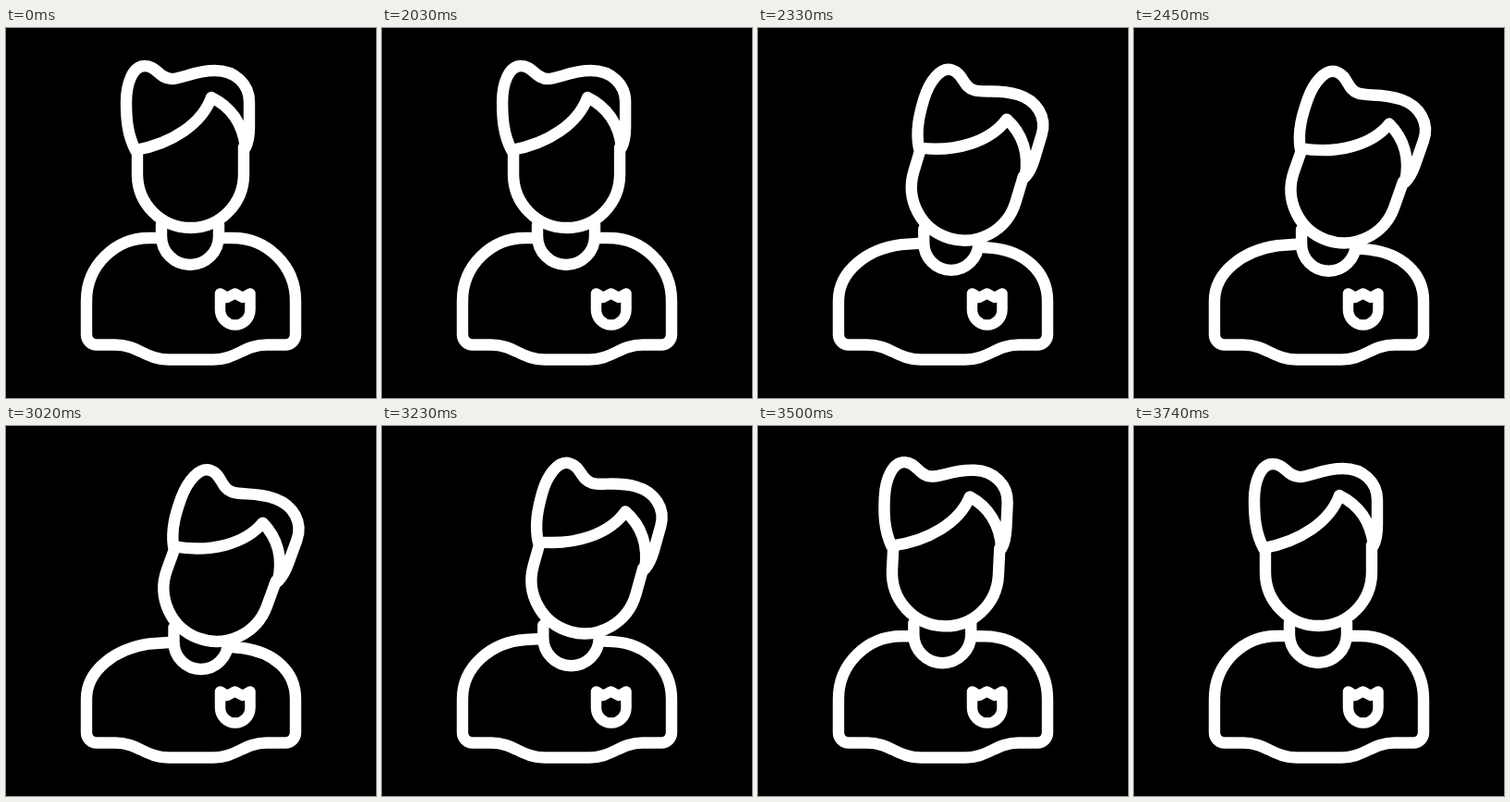
Recreate the animation shown at these times as an HTML page. Size 400 px wide and 400 px high, loop 3.77 s.

```html
<!DOCTYPE html>
<html lang="en">
<head>
<meta charset="utf-8">
<title>Officer tilting his head</title>
<style>
  html, body { margin: 0; width: 100%; height: 100%; overflow: hidden; background: #000; }
  svg { display: block; width: 100vw; height: 100vh; }
</style>
</head>
<body>
<svg viewBox="0 0 400 400" fill="none" stroke="#fff" stroke-width="12.400" stroke-linecap="round" stroke-linejoin="round">
  <path id="body"/>
  <path d="M231.500 287L239 291.500L247.500 287L256 291.500L264 287V304.500A16.250 16.500 0 0 1 231.500 304.500Z" stroke-width="11.500"/>
  <path id="neck"/>
  <g id="head" fill="#000">
    <path d="M142 133V158A57.500 58 0 0 0 257 158V129"/>
    <path d="M140 132C131 115 130 97 130 80C130 60 137 41 150 41C163 41 166 55 179 55C191 55 203 46 226 46C247 46 263 60 263 80V107C263 116 262 123 259 129C256 104 243 85 222 75C212 103 180 125 140 132Z"/>
  </g>
</svg>
<script>
const LOOP = 3770;
const TILT = 20;
const PIVOT = [200, 215];
const [body, neck, head] = ['body', 'neck', 'head'].map(id => document.getElementById(id));

// Cubic Bézier easing with flat ends; a and b are the horizontal handles.
function ease(x, a, b) {
  if (x <= 0) return 0;
  if (x >= 1) return 1;
  let lo = 0, hi = 1;
  for (let i = 0; i < 24; i++) {
    const s = (lo + hi) / 2, r = 1 - s;
    if (3 * a * s * r * r + 3 * b * s * s * r + s ** 3 < x) lo = s; else hi = s;
  }
  return lo * lo * (3 - 2 * lo);
}

function draw(t) {
  const lean = ease((t - 2010) / 560, 0.47, 0.22);
  const turn = lean - ease((t - 3010) / 740, 0.45, 0.38);
  const shift = lean - ease((t - 3010) / 620, 0.38, 0.2);
  const mix = (from, to) => from + (to - from) * shift;
  const pt = (x, y, x2, y2) => `${mix(x, x2).toFixed(2)} ${mix(y, y2).toFixed(2)} `;

  body.setAttribute('d',
    'M' + pt(162, 227, 176, 234) + 'L' + pt(155, 227, 155, 235.5) +
    'C' + pt(117.4, 227, 118, 241) + pt(87, 257.4, 87, 264) + '87 295' +
    'V331.500A11 11 0 0 0 98 342.500H118C143 342.500 151 358.500 176 358.500' +
    'H224C249 358.500 257 342.500 282 342.500H302A11 11 0 0 0 313 331.500V295' +
    'C' + pt(313, 257.4, 313, 264) + pt(282.6, 227, 288, 244) + pt(245, 227, 255, 240) +
    'L' + pt(236, 227, 244, 239));

  const left = mix(168, 181.5), right = mix(230, 240), bottom = mix(256, 263);
  const radius = (right - left) / 2, base = bottom - radius;
  neck.setAttribute('d',
    `M${left} ${mix(213, 218)}V${base}A${radius} ${radius} 0 0 0 ${right} ${base}V213`);

  head.setAttribute('transform',
    `translate(${9 * shift} ${13.7 * shift}) rotate(${TILT * turn} ${PIVOT})`);
}

const start = performance.now();
function tick() {
  draw((performance.now() - start) % LOOP);
  requestAnimationFrame(tick);
}
tick();
</script>
</body>
</html>
```
